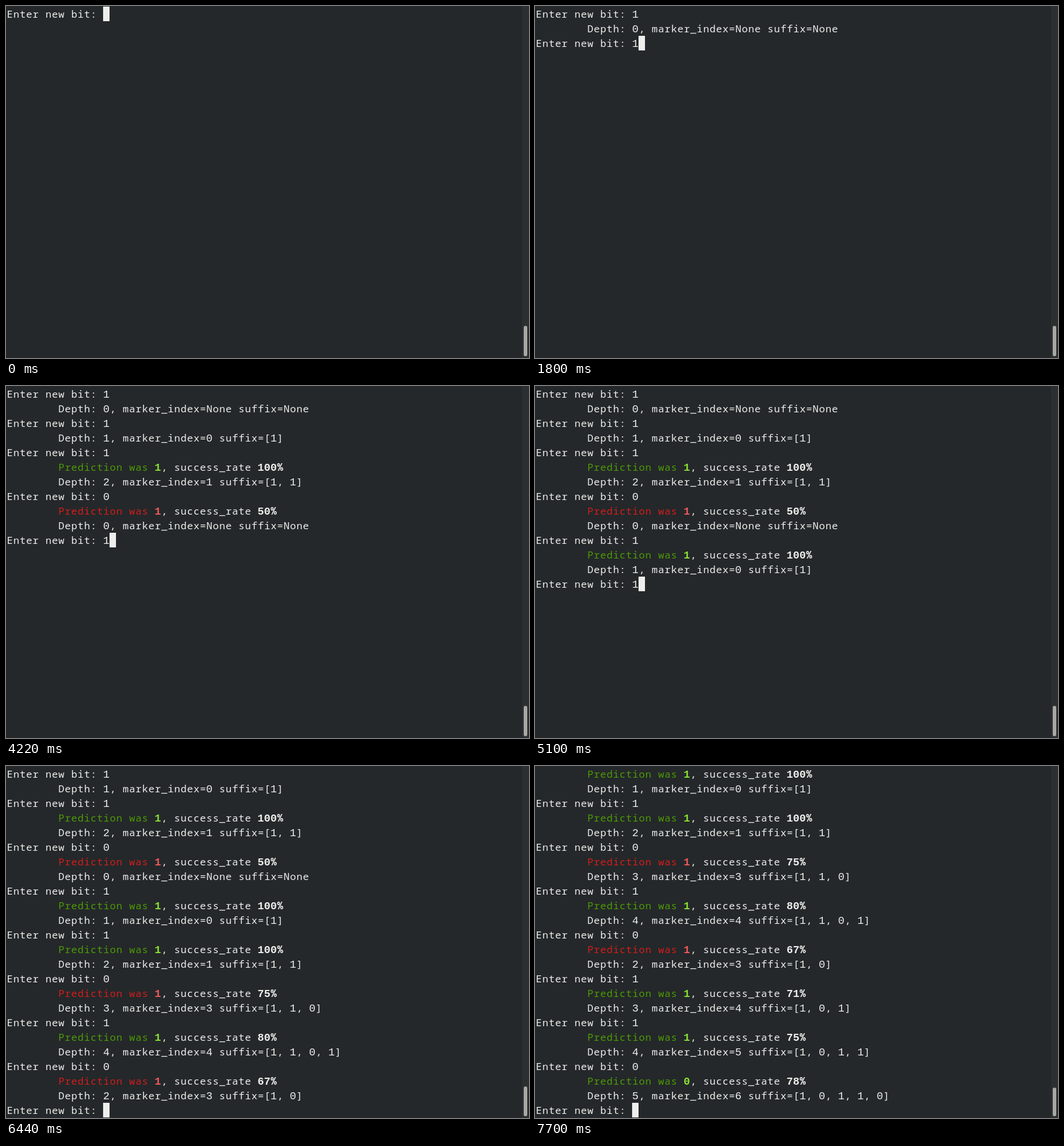
An HTML page that plays this animation: 894 by 602 pixels, repeating every 8000 ms.

```html
<!DOCTYPE html>
<html lang="en">
<head>
<meta charset="utf-8">
<title>Bit predictor</title>
<style>
  html, body { margin: 0; width: 100%; height: 100%; overflow: hidden; background: #24282a; }
  svg { display: block; width: 894px; height: 602px; }
  text { white-space: pre; fill: #eeeeec; font: 17px "Noto Sans Mono", monospace; letter-spacing: 0.8px; }
  .num { font: 18.33px "Liberation Mono", monospace; letter-spacing: 0; }
  .bold { font-weight: 700; }
  .hit { fill: #4e9a06; }
  .hit.bold { fill: #8ae234; }
  .miss { fill: #d41c1c; }
  .miss.bold { fill: #f05a5a; }
</style>
</head>
<body>
<svg viewBox="0 0 894 602">
  <rect width="894" height="602" fill="#24282a"/>
  <rect x="882" width="12" height="602" fill="#2b2f2f"/>
  <rect id="thumb" x="885" width="6" rx="3" fill="#a8a8a5"/>
  <g id="screen"></g>
  <rect id="cursor" width="11" height="25" fill="#eeeeec"/>
</svg>
<script>
const LOOP = 8000, CELL = 11, LINE = 25, ROWS = 24, INDENT = 8;
const PROMPT = "Enter new bit: ";
const BITS = "111011010110";

// Key presses alternate: a bit, then Enter.
const keys = [1000, 1300, 1800, 2290, 2890, 3020, 3610, 3760, 4220, 4400, 5100, 5170,
  5460, 5570, 5940, 6070, 6330, 6440, 6730, 6840, 7180, 7280, 7620, 7700];
const blinks = [2890, 4220, 5170, 6330, 7180, 7700];

const passed = (times, t) => times.filter(x => t >= x).length;
const [screen, cursor, thumb] = ["screen", "cursor", "thumb"].map(id => document.getElementById(id));

function set(el, attrs) {
  for (const name in attrs) el.setAttribute(name, attrs[name]);
}

// Longest suffix that also ends earlier, and where it first ended.
function match(bits) {
  for (let depth = bits.length - 1; depth > 0; depth--) {
    const at = bits.indexOf(bits.slice(-depth));
    if (at < bits.length - depth) return { depth, marker: at + depth - 1 };
  }
  return { depth: 0, marker: "None" };
}

// A line is a start column and a list of [text, class] runs.
const line = (col, ...runs) => ({ col, runs });

// Output of each round: the bit that followed the last match is the prediction.
function play() {
  let guess, hits = 0, tries = 0;
  return [...BITS].map((bit, i) => {
    const out = [], bits = BITS.slice(0, i + 1);
    const { depth, marker } = match(bits);
    if (guess) {
      const hit = guess === bit, tone = hit ? "hit" : "miss";
      tries++;
      if (hit) hits++;
      out.push(line(INDENT, ["Prediction was ", tone], [guess, tone + " bold"],
        [", success_rate ", ""], [Math.round(100 * hits / tries) + "%", "bold"]));
    }
    const suffix = depth ? `[${[...bits.slice(-depth)].join(", ")}]` : "None";
    out.push(line(INDENT, [`Depth: ${depth}, marker_index=${marker} suffix=${suffix}`, ""]));
    if (depth) guess = bits[marker + 1];
    else tries = hits; // a miss without a match is forgiven
    return out;
  });
}

const rounds = play();

function lineMarkup({ col, runs }, row) {
  let spans = "";
  for (const [text, tone] of runs) {
    for (const part of text.match(/\d+|\D+/g)) {
      const num = /\d/.test(part);
      const x = 1 + col * CELL + (num ? 0 : 0.4);
      spans += `<tspan x="${x}" class="${tone}${num ? " num" : ""}">${part}</tspan>`;
      col += part.length;
    }
  }
  return `<text y="${20 + row * LINE}">${spans}</text>`;
}

function draw(step, t) {
  const done = step >> 1, typing = step % 2;
  const lines = rounds.slice(0, done).flatMap((out, i) => [line(0, [PROMPT + BITS[i], ""]), ...out]);
  lines.push(line(0, [PROMPT + (typing ? BITS[done] : ""), ""]));
  const shown = lines.slice(-ROWS);
  screen.innerHTML = shown.map(lineMarkup).join("");
  set(cursor, {
    x: 1 + (PROMPT.length + typing) * CELL,
    y: 1 + (shown.length - 1) * LINE,
    visibility: passed(blinks, t) % 2 ? "hidden" : "visible"
  });
  const top = 547 + Math.round((lines.length - shown.length) * 0.27);
  set(thumb, { y: top, height: 599 - top });
}

const start = performance.now();
let last = -1;

function tick() {
  const t = (performance.now() - start) % LOOP;
  const step = passed(keys, t);
  if (step !== last) draw(step, t);
  last = step;
  requestAnimationFrame(tick);
}
tick();
</script>
</body>
</html>
```
